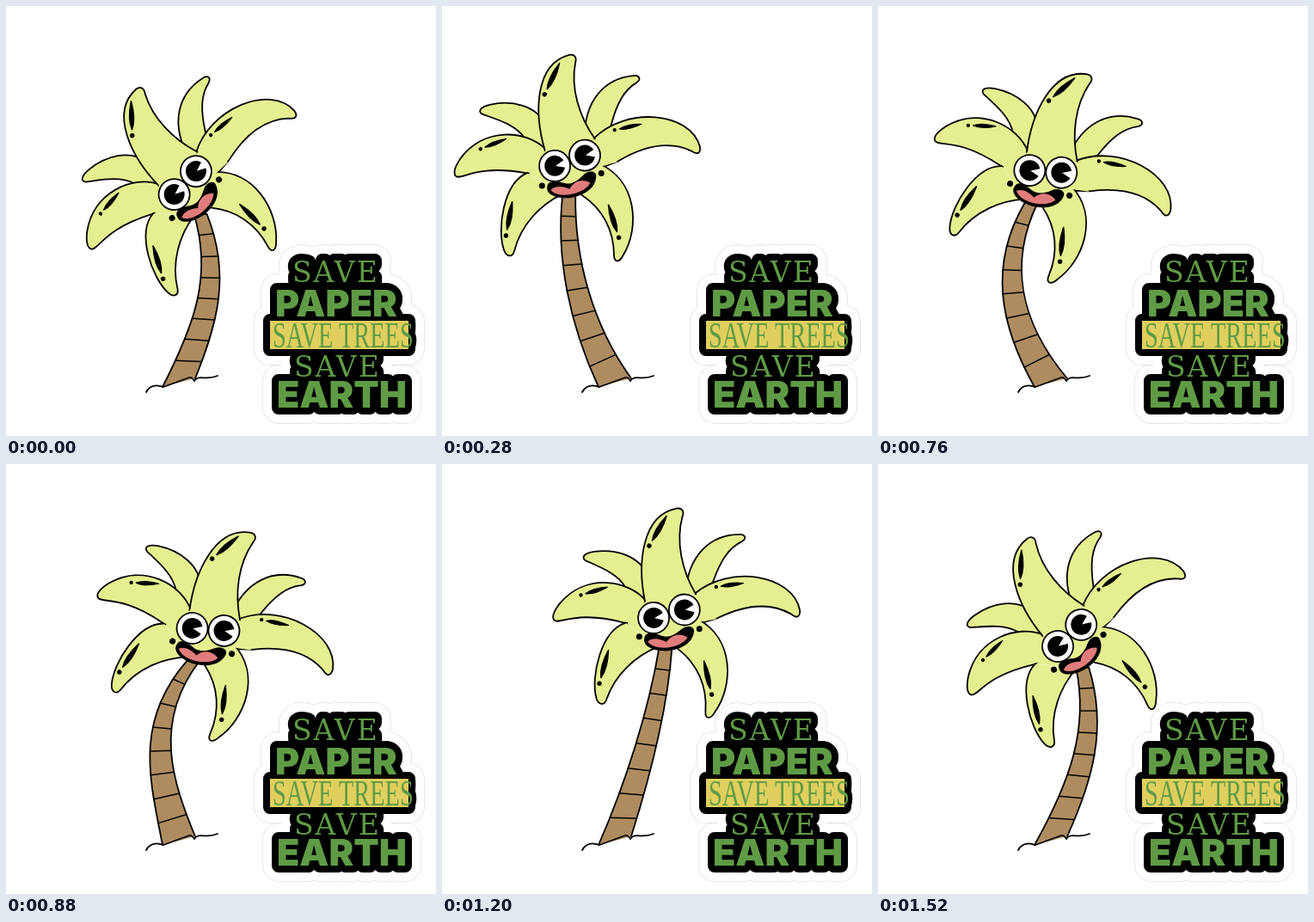
These frames come from a looping animation (500x500 px, 1600 ms). An HTML page:

```html
<!DOCTYPE html>
<html lang="en">
<head>
<meta charset="utf-8">
<title>Dancing palm</title>
<style>
  html, body { margin: 0; width: 100%; height: 100%; overflow: hidden; background: #fff; }
  svg { display: block; width: 100vw; height: 100vh; }
  .line { fill: none; stroke: #000; stroke-width: 1.8; stroke-linecap: round; stroke-linejoin: round; }
  .leaf { fill: #e5ef8f; }
  .slab { font: 33px "DejaVu Serif", serif; letter-spacing: 2px; }
  .heavy { font: 900 43px Inter, sans-serif; }
  .narrow { font: 43px "Liberation Serif", serif; }
</style>
</head>
<body>
<svg viewBox="0 0 500 500">
  <defs>
    <g id="words">
      <text class="slab" x="333" y="321">SAVE</text>
      <text class="heavy" x="313" y="361">PAPER</text>
      <text class="narrow" transform="translate(310 397) scale(.66 1)">SAVE TREES</text>
      <text class="slab" x="335" y="431">SAVE</text>
      <text class="heavy" x="315" y="467">EARTH</text>
    </g>
    <rect id="bar" x="307" y="366" width="161" height="33"/>
    <g id="sign">
      <use href="#words"/>
      <use href="#bar"/>
    </g>
    <g id="eye">
      <circle class="line" r="18" style="fill:#fff"/>
      <path d="M1 0L10.2 -6.5A12 12 0 1 0 11.9 2Z"/>
    </g>
    <g id="shine">
      <path d="M-16 0Q-4 -5 17 0Q-4 5 -16 0Z" stroke="#000" stroke-width="1.5" stroke-linejoin="round"/>
      <circle cx="-23" r="2.7"/>
    </g>
  </defs>

  <g stroke-linejoin="round">
    <use href="#sign" fill="#dedede" stroke="#dedede" stroke-width="37.5"/>
    <use href="#sign" fill="#fff" stroke="#fff" stroke-width="36"/>
    <use href="#sign" stroke="#000" stroke-width="16"/>
    <use href="#bar" fill="#e0cf5e"/>
    <use href="#words" fill="#5f9b45"/>
  </g>

  <path id="trunk" class="line" style="fill:#ae8c60"/>
  <path id="rings" class="line" style="stroke-width:1.5"/>
  <path class="line" d="M163 449C167 441 175 440 183 443L213 432Q216 431 219 436C224 428 233 436 246 430"/>

  <g id="head">
    <circle class="leaf" cx="150" cy="184" r="36"/>
    <g class="line">
      <path class="leaf" d="M115 175L97 154C86 138 64 132 48 126C42 122 48 117 58 115C82 110 112 116 122 140L130 165"/>
      <path class="leaf" d="M167 155C167 112 190 86 224 83C231 82 234 87 228 91C214 99 205 114 198 140L185 160"/>
      <path class="leaf" d="M122 168C100 145 50 140 22 178C16 187 13 194 17 198C24 203 40 184 98 195L140 200"/>
      <path class="leaf" d="M177 156C215 118 290 125 301 166C302 174 298 176 291 171C262 157 230 168 206 182L185 190"/>
      <path class="leaf" d="M121 170C108 125 110 68 150 58C156 57 159 61 157 67C151 97 161 130 179 156"/>
      <path class="leaf" d="M100 195C72 206 64 260 72 284C75 293 82 293 84 286C92 255 115 232 140 220"/>
      <path class="leaf" d="M184 185C228 205 230 260 211 291C206 301 200 300 200 291C200 262 187 237 163 221"/>
    </g>
    <path class="leaf" d="M102 196L122 168L178 157L205 183L186 188L163 220L140 219Z"/>
    <use href="#shine" transform="translate(131 83) rotate(-64)"/>
    <use href="#shine" transform="translate(63 160) rotate(-21) scale(.8)"/>
    <use href="#shine" transform="translate(220 142) rotate(-12) scale(.8)"/>
    <use href="#shine" transform="translate(79 245) rotate(-79)"/>
    <use href="#shine" transform="translate(199 249) rotate(-107)"/>
    <path d="M123 211C124 203 134 204 142 207C152 210 160 203 165 198C171 192 180 193 180 199C180 212 168 221 152 224C138 226 121 222 123 211Z"/>
    <path fill="#e07c7c" d="M127 215C133 209 142 211 149 214C153 206 163 201 173 207C168 219 138 227 127 215Z"/>
    <circle cx="117" cy="210" r="3.5"/>
    <circle cx="186" cy="196" r="3.5"/>
    <use href="#eye" x="132" y="187"/>
    <use href="#eye" x="167" y="175"/>
  </g>
</svg>
<script>
const LOOP = 1600, HALF = 800, TICK = 80, STEPS = 19, RIGHTMOST = 14.5;
const byId = id => document.getElementById(id);

// Each swing pauses for one extra tick at its far end; the first starts half a tick early.
function stepAt(time) {
  const leftward = time < HALF;
  const tick = Math.floor((time + (leftward ? TICK / 2 : 0)) / TICK);
  return tick - (time >= (leftward ? 520 : 1280) ? 1 : 0);
}

// Mean plus [cosine, sine] amplitudes of successive harmonics
const wave = (angle, mean, ...harmonics) => harmonics.reduce(
  (sum, [c, s], i) => sum + c * Math.cos((i + 1) * angle) + s * Math.sin((i + 1) * angle), mean);

function bezier(p, t) {
  const s = 1 - t;
  return [0, 1].map(k => s * s * s * p[0][k] + 3 * s * s * t * p[1][k] + 3 * s * t * t * p[2][k] + t * t * t * p[3][k]);
}

function draw(step) {
  const swing = 2 * Math.PI * (step - RIGHTMOST) / STEPS;
  const x = wave(swing, 206.9, [60, 7], [-3.6, -4.7], [2.6, 0]);
  const y = wave(swing, 208.9, [-0.5, 4.4], [-12, -2]);
  const tilt = wave(swing, -2.4, [0.8, -24.4], [4.5, -1], [0, 1.7]);
  const lowBend = wave(swing, 193.3, [34.9, 26.9], [-1.5, 0], [0, -8]);
  const highBend = wave(swing, 192.2, [50.3, 45.6], [-2.5, 6.2], [7, -8]);

  byId('head').setAttribute('transform', `translate(${x} ${y}) rotate(${tilt + 5}) translate(-151.8 -203.8)`);

  const a = tilt * Math.PI / 180;
  const topX = x - 5 * Math.cos(a) - 17 * Math.sin(a);
  const topY = y - 5 * Math.sin(a) + 17 * Math.cos(a);
  const edge = side => [
    [201 + side * 19, 438 - side * 5],
    [lowBend + side * 13, 370],
    [highBend + side * 11, topY + 72],
    [topX + side * 7.5, topY]
  ];
  const left = edge(-1), right = edge(1);
  const [r0, r1, r2, r3] = right;
  byId('trunk').setAttribute('d', `M${left[0]}C${left.slice(1).join(' ')}L${r3}C${r2} ${r1} ${r0}`);

  let rings = '';
  for (let i = 0; i < 7; i++) {
    const t = 0.125 + 0.127 * i;
    const [lx, ly] = bezier(left, t), [rx] = bezier(right, t);
    const [nx, ny] = bezier(left, t + 0.02);
    const skew = (nx - lx) / (ly - ny) * (rx - lx) / 780;
    rings += `M${bezier(left, t + skew)}L${bezier(right, t - skew)}`;
  }
  byId('rings').setAttribute('d', rings);
}

function frame() {
  draw(stepAt(performance.now() % LOOP));
  requestAnimationFrame(frame);
}
frame();
</script>
</body>
</html>
```
